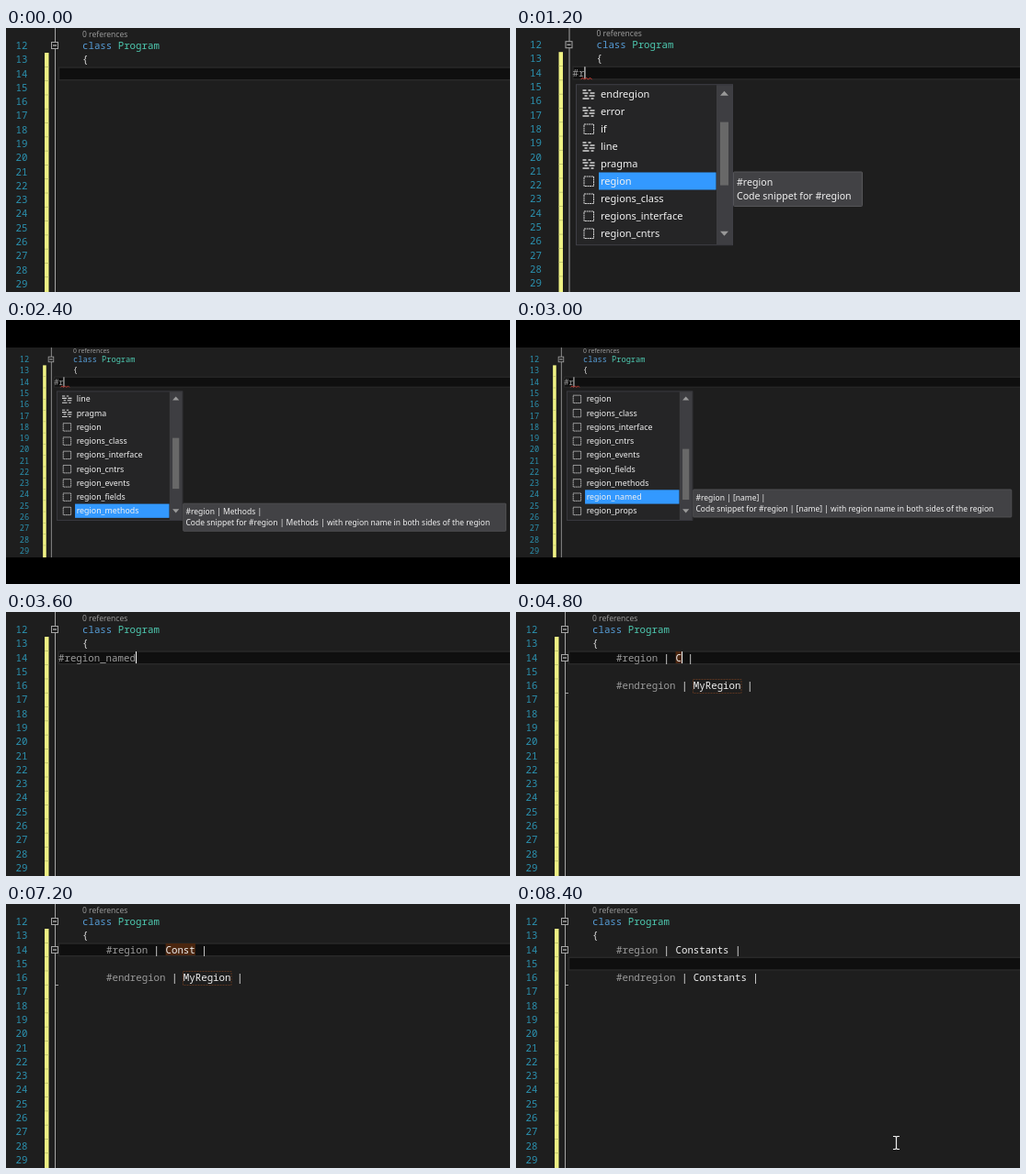
Recreate the animation shown at these times as an HTML page. Size 548 px wide and 288 px high, loop 9000 ms.

```html
<!DOCTYPE html>
<html lang="en">
<head>
<meta charset="utf-8">
<title>Region snippet</title>
<style>
html, body { margin: 0; width: 100%; height: 100%; overflow: hidden; background: #1e1e1e; }
svg { display: block; width: 548px; height: 288px; }
text { white-space: pre; }
.code { font: 10.75px "Noto Sans Mono", "DejaVu Sans Mono", monospace; }
.ui { font: 11px "Noto Sans", "Open Sans", sans-serif; fill: #f1f1f1; }
.tip { font-size: 10.6px; }
.lens { font: 8.5px "Noto Sans", "Open Sans", sans-serif; fill: #999; }
</style>
</head>
<body>
<svg id="stage" viewBox="0 0 548 288"></svg>
<script>
const STEP = 600, STEPS = 15;
const ROW = 15.29, CHAR = 6.46, LEFT = 57, INDENT = 109;
const stage = document.getElementById('stage');

const KEYWORDS = ['define', 'elif', 'else', 'endif', 'endregion', 'error', 'line', 'pragma'];
const ITEMS = ['define', 'elif', 'else', 'endif', 'endregion', 'error', 'if', 'line', 'pragma',
  'region', 'regions_class', 'regions_interface', 'region_cntrs', 'region_events',
  'region_fields', 'region_methods', 'region_named', 'region_props'];

const WIDE = { x: 6.6, y: 27.3, scale: .8125, top: 27, bottom: 261 };
const WIDER = { x: 6.4, y: 27.7, scale: .803, top: 30, bottom: 259 };

const region = (name, extra) => ({ name, end: 'MyRegion', caret: true, ...extra });
const SCENES = [
  {},
  { typed: '#' },
  { typed: '#r', view: { x: 4.5, y: -.8, scale: 1 }, list: { first: 4, pick: 9, width: 140 } },
  { typed: '#r', view: WIDE, list: { first: 5, pick: 13, label: 'Events', width: 425 } },
  { typed: '#r', view: WIDER, list: { first: 7, pick: 15, label: 'Methods', width: 437 } },
  { typed: '#r', view: WIDER, list: { first: 9, pick: 16, label: '[name]', width: 431 } },
  { typed: '#region_named' },
  region('MyRegion', { field: '#264f78', caret: false }),
  region('C'),
  region('Co'),
  region('Con'),
  region('Cons'),
  region('Const', { caret: false }),
  region('Constants'),
  { name: 'Constants', end: 'Constants', line: 15, done: true }
];

const baseline = line => 23 + (line - 12) * ROW;
const rect = (x, y, w, h, fill, more = '') =>
  `<rect x="${x}" y="${y}" width="${w}" height="${h}" fill="${fill}" ${more}/>`;
const path = (d, stroke, more = '') => `<path d="${d}" fill="none" stroke="${stroke}" ${more}/>`;
const label = (x, y, str, cls) => `<text x="${x}" y="${y}" class="${cls}">${str}</text>`;
const code = (x, line, str, fill) =>
  `<text x="${x}" y="${baseline(line)}" class="code" fill="${fill}">${str}</text>`;
const caret = (x, line) => rect(x, baseline(line) - 10.5, 1, 13, '#fff');

function foldBox(line) {
  const y = Math.round(baseline(line) - 7) - .5;
  return rect(49.5, y, 7, 7, '#1e1e1e', 'stroke="#a5a5a5"') +
    path(`M51 ${y + 3.5}h4`, '#e0e0e0');
}

function editor(line) {
  let out = rect(-20, -20, 740, 340, '#1e1e1e');
  const y = baseline(line) - 11;
  out += rect(57.5, y + .5, 660, 13.6, '#0f0f0f', 'stroke="#292929" stroke-width="1.4"');
  out += rect(42, 27, 4.5, 270, '#eff284');
  for (let n = 12; n < 30; n++) {
    out += code(10.5, n, n, '#2b91af');
    if (n > 13) out += rect(42, baseline(n) - 11.6, 4.5, .8, '#b9bc68');
  }
  out += path('M53.5 -4V300', '#a5a5a5') + foldBox(12);
  out += label(83, 10, '0 references', 'lens');
  out += code(83, 12, '<tspan fill="#569cd6">class</tspan> <tspan fill="#4ec9b0">Program</tspan>', '#dcdcdc');
  return out + code(83, 13, '{', '#dcdcdc');
}

function regionBlock({ name, end, caret: showCaret, field = '#4b260f', done }) {
  const directive = (word, title) => `<tspan fill="#9b9b9b">${word}</tspan> | ${title} |`;
  const x = INDENT + 10 * CHAR, w = name.length * CHAR;
  let out = foldBox(14) + path('M53.5 88.5h3.5', '#a5a5a5');
  if (!done) {
    out += rect(x, 43, w, 13, field);
    out += rect(192.5, 73.5, 52.5, 15, 'none', 'stroke="#6b3a20" stroke-width=".8" stroke-dasharray="2 1"');
  }
  out += code(INDENT, 14, directive('#region', name), '#f0f0f0');
  out += code(INDENT, 16, directive('#endregion', end), '#f0f0f0');
  return showCaret ? out + caret(x + w, 14) : out;
}

function icon(name, y) {
  if (KEYWORDS.includes(name)) {
    return path(`M68 ${y - 4}h4m2 0h3M68 ${y - 1}h6m2 0h5M70 ${y + 2}h3m2 0h6M68 ${y + 5}h7m2 0h3`, '#d8d8d8', 'stroke-width="1.3"');
  }
  return rect(69.5, y - 5, 10.5, 10.5, 'none', 'stroke="#d8d8d8" stroke-dasharray="2 .6"');
}

function popup({ first, pick, label: title, width }) {
  const rowY = i => 72.8 + (i - first) * 19;
  let out = rect(61, 62.5, 170, 175, '#252526', 'stroke="#3f3f46"');
  out += rect(213.5, 63, 17, 174, '#3e3e42');
  out += rect(217.5, 73.6 + 7.45 * first, 9, 69, '#686868');
  out += '<path d="M217.5 74.5l4.5-5 4.5 5zM217.5 222.5l4.5 5 4.5-5z" fill="#999"/>';
  out += rect(85.5, rowY(pick) - 9.5, 127.5, 19, '#3399ff');
  for (let i = first; i < first + 9; i++) {
    out += icon(ITEMS[i], rowY(i)) + label(87.5, rowY(i) + 4, ITEMS[i], 'ui');
  }
  const y = rowY(pick), head = title ? `#region | ${title} |` : '#region';
  const tail = title ? ' with region name in both sides of the region' : '';
  out += rect(232, y - 10, width, 37.5, '#424245', 'stroke="#555558" rx="1"');
  out += label(235.5, y + 5, head, 'ui tip');
  return out + label(235.5, y + 20, `Code snippet for ${head}${tail}`, 'ui tip');
}

function render(scene) {
  const { view, typed, list, name, line = 14 } = scene;
  let out = editor(line);
  if (typed) out += code(LEFT, 14, typed, '#9b9b9b') + caret(LEFT + typed.length * CHAR, 14);
  if (list) out += path('M66 57l2-2 2 2 2-2 2 2 2-2 2 2', '#e03c32') + popup(list);
  if (name) out += regionBlock(scene);
  if (view) out = `<g transform="translate(${view.x} ${view.y}) scale(${view.scale})">${out}</g>`;
  if (view && view.top) {
    out += rect(0, 0, 548, view.top, '#000') + rect(0, view.bottom, 548, 288 - view.bottom, '#000');
  }
  if (scene.done) out += path('M410 253.5h2.5l1 1 1-1h2.5M413.5 254v12M410 267.5h2.5l1-1 1 1h2.5', '#f0f0f0', 'stroke-width="1.2"');
  return out;
}

let shown = -1;
function tick() {
  const step = Math.floor(performance.now() / STEP) % STEPS;
  if (step !== shown) {
    shown = step;
    stage.innerHTML = render(SCENES[step]);
  }
  requestAnimationFrame(tick);
}
tick();
</script>
</body>
</html>
```
